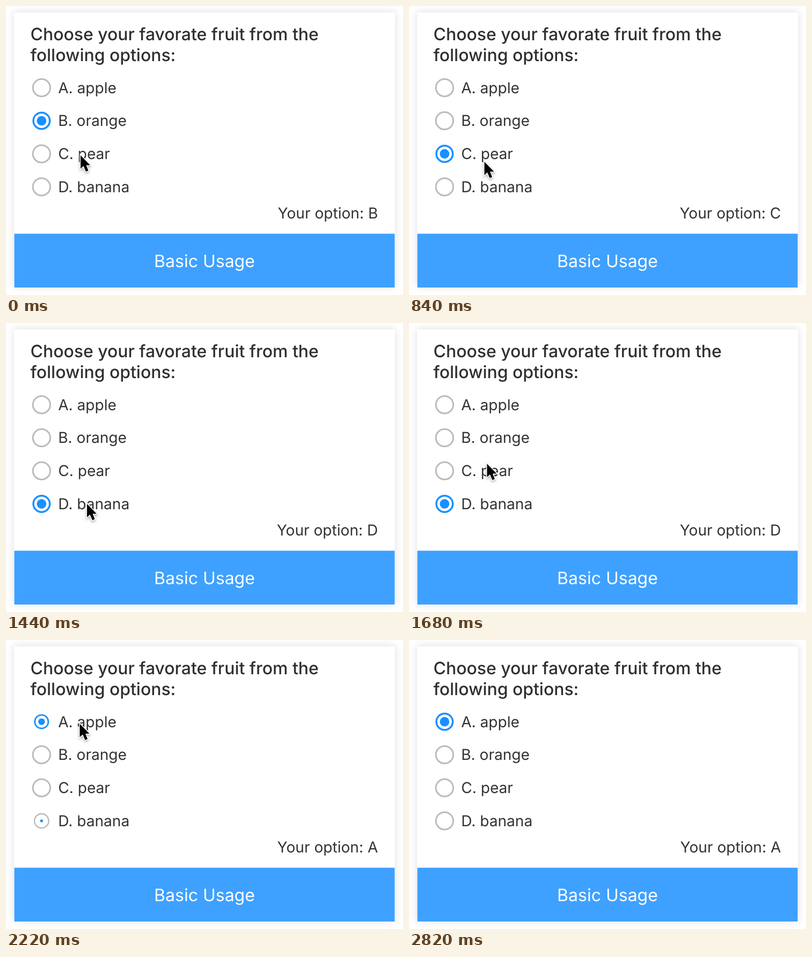
Recreate the animation shown at these times as an HTML page. Size 740 by 540 pixels, loop 3 s.

```html
<!DOCTYPE html>
<html lang="en">
<head>
<meta charset="utf-8">
<style>
  html, body { margin: 0; width: 740px; height: 540px; overflow: hidden; background: #fff; }
  .card { position: absolute; left: 15px; top: 12px; width: 710px; height: 514px;
    background: #fff; box-shadow: 0 -1px 14px rgba(0, 0, 0, .13); }
  svg { position: absolute; left: 0; top: 0; }
  text { font: 28.1px Inter, "Open Sans", sans-serif; font-optical-sizing: none;
    text-rendering: geometricPrecision; fill: #333; }
  .title { font-size: 31.95px; font-weight: 500; fill: #2f2f2f; }
  .button { font-size: 32px; fill: #fff; text-anchor: middle; }
  .answer { text-anchor: end; }
  .ring { fill: #fff; }
  .dot { fill: #1890ff; }
  #cursor { filter: drop-shadow(0 2px 2px rgba(0, 0, 0, .35)); }
</style>
</head>
<body>
<div class="card"></div>
<svg width="740" height="540">
  <text class="title" x="45.5" y="64">Choose your favorate fruit from the</text>
  <text class="title" x="45.5" y="103">following options:</text>
  <g id="options"></g>
  <text class="answer" x="693.3" y="396.5">Your option: <tspan id="answer"></tspan></text>
  <rect x="15.5" y="425.5" width="709" height="100.5" fill="#3ea1ff"/>
  <text class="button" x="370" y="488">Basic Usage</text>
  <path id="cursor" d="M0 0V25L5.5 20L10 30.5L14.5 28.5L10.5 18.5H18Z"
    stroke="#fff" stroke-width="3" paint-order="stroke"/>
</svg>
<script>
const LOOP = 3000, SWAP = 190;
const fruits = ['apple', 'orange', 'pear', 'banana'];
const letters = 'ABCD';
// Each click: [time, index of the chosen option]
const clicks = [[-SWAP, 1], [362, 2], [1145, 3], [2088, 0]];
// Cursor stops: [time, x, y]
const path = [
  [0, 139, 279], [180, 137, 277], [480, 137, 277], [840, 140.5, 291], [1080, 151, 338],
  [1460, 151, 338], [1960, 137.5, 156.5], [2380, 137.5, 156.5], [2600, 150, 360], [2780, 160, 548], [LOOP, 160, 548]
];
const $ = id => document.getElementById(id);
const mix = (a, b, p) => a + (b - a) * p;
const smooth = p => p * p * (3 - 2 * p);

$('options').innerHTML = fruits.map((fruit, i) => {
  const y = 152.7 + i * 61.75;
  return `<g transform="translate(66.3 ${y})"><circle class="ring"/><circle class="dot"/></g>
    <text x="97.2" y="${y + 9.8}">${letters[i]}. ${fruit}</text>`;
}).join('');
const radios = [...document.querySelectorAll('#options g')];

function drawRadio(radio, amount) {
  const [ring, dot] = radio.children;
  const on = amount > .5;
  const scale = 1 - .6 * Math.min(amount, 1 - amount);
  ring.setAttribute('r', (on ? 15.3 : 16.2) * scale);
  ring.setAttribute('stroke', on ? '#1890ff' : '#bbb');
  ring.setAttribute('stroke-width', (on ? 3.5 : 3) * scale);
  dot.setAttribute('r', 8.9 * amount);
}

function draw(t) {
  const current = clicks.findLastIndex(([time]) => time <= t);
  const [time, chosen] = clicks[current];
  const previous = current ? clicks[current - 1][1] : -1;
  const progress = Math.min((t - time) / SWAP, 1);
  radios.forEach((radio, i) =>
    drawRadio(radio, i === chosen ? progress : i === previous ? 1 - progress : 0));
  $('answer').textContent = letters[chosen];

  const next = path.findIndex(([stop]) => stop > t);
  const [t0, x0, y0] = path[next - 1], [t1, x1, y1] = path[next];
  const p = smooth((t - t0) / (t1 - t0));
  $('cursor').setAttribute('transform', `translate(${mix(x0, x1, p)} ${mix(y0, y1, p)})`);
}

const start = performance.now();
function tick() {
  draw((performance.now() - start) % LOOP);
  requestAnimationFrame(tick);
}
tick();
</script>
</body>
</html>
```
